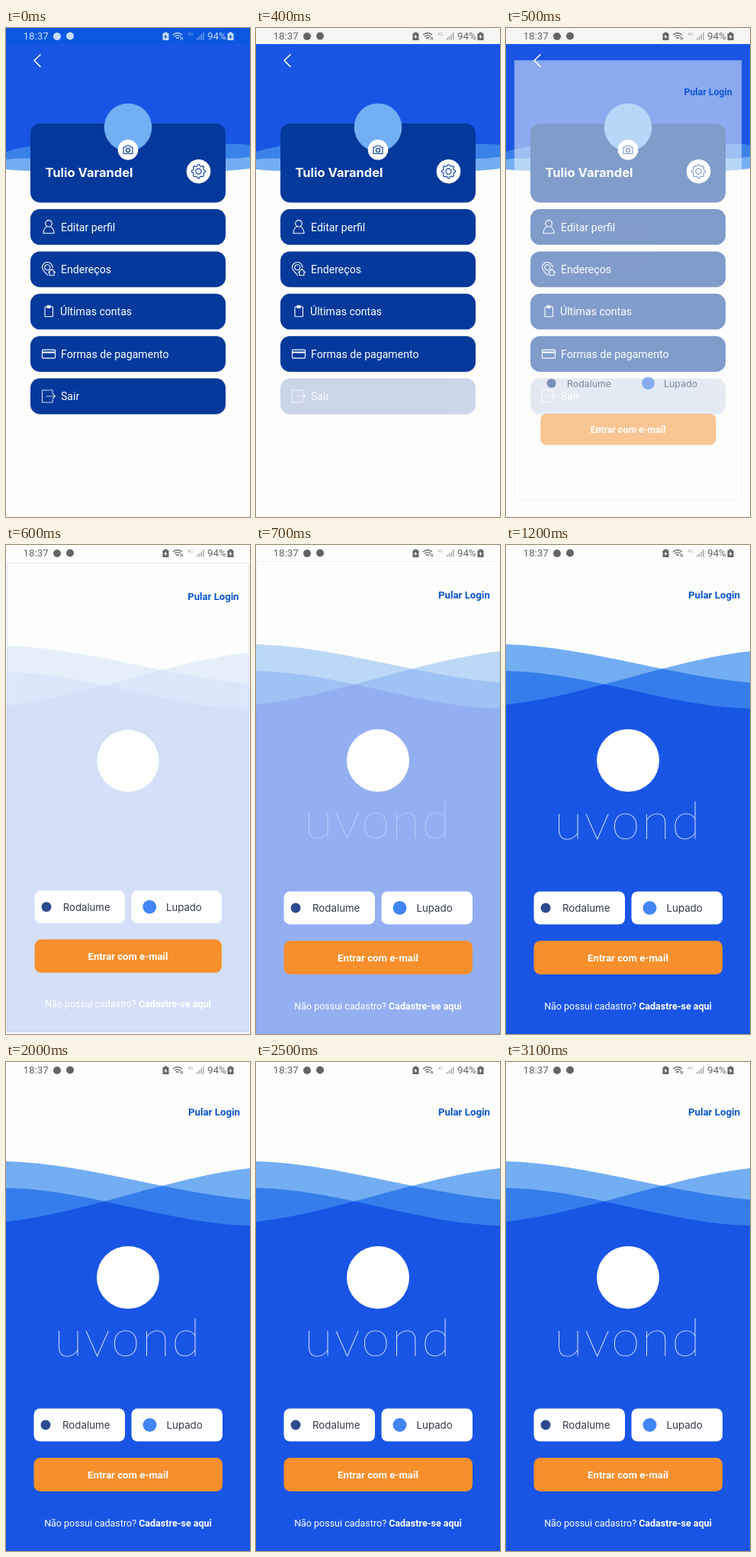
Recreate the animation shown at these times as an HTML page. Size 320 by 640 pixels, loop 3200 ms.

```html
<!DOCTYPE html>
<html lang="pt">
<head>
<meta charset="utf-8">
<style>
  html, body { margin: 0; width: 100%; height: 100%; overflow: hidden; background: #fdfefc; }
  svg { display: block; width: 320px; height: 640px; }
  text { font-family: Roboto, sans-serif; }
  .inter { font-family: Inter, sans-serif; }
  .bold { font-weight: 700; }
  .line { fill: none; stroke: #fff; stroke-width: 1.1; stroke-linejoin: round; stroke-linecap: round; }
  .blue { stroke: #02399a; }
  #login { transform-origin: 160px 331px; }
</style>
</head>
<body>
<svg viewBox="0 0 320 640">
  <rect width="320" height="640" fill="#fdfefc"/>

  <g id="profile">
    <path fill="#73aef2" d="M0 0H320V184Q304 186 288 187H32Q16 187 0 185Z"/>
    <path fill="#3a82ea" d="M0 0H320V168.500Q304 171 288 171H32Q16 169.500 0 172Z"/>
    <path fill="#1955e5" d="M0 0H320V153Q304 151 288 152L32 154.500Q16 157 0 162Z"/>
    <path class="line" style="stroke-width:1.7" d="M45 35L37 42.500L45 50.500"/>
    <rect x="32" y="125" width="256" height="103.500" rx="13" fill="#02399a"/>
    <circle cx="160" cy="130" r="31.300" fill="#73aff3"/>
    <circle cx="160" cy="159.300" r="13.300" fill="#fff"/>
    <path class="line blue" d="M154 156H156.500L158 154H162L163.500 156H166V164.500H154Z"/>
    <circle class="line blue" cx="160" cy="160" r="2.600"/>
    <circle cx="252.500" cy="187.700" r="15.800" fill="#fff"/>
    <path id="gear" class="line blue"/>
    <circle class="line blue" cx="252.500" cy="187.700" r="3.600"/>
    <text class="inter bold" x="51.500" y="195" font-size="16.500" fill="#fff">Tulio Varandel</text>
    <g id="menu"></g>
  </g>

  <g id="login">
    <rect id="sheet" y="21" width="320" height="619" fill="#fdfefc"/>
    <g id="waves"></g>
    <text class="bold" x="239" y="69.500" font-size="13.250" fill="#0a55cf">Pular Login</text>
    <circle cx="160" cy="282" r="41" fill="#fff"/>
    <text id="wordmark" x="160" y="384.500" font-size="69" text-anchor="middle" fill="#fff"
      style="font-family:Lato,sans-serif;font-weight:200;letter-spacing:2px">uvond</text>
    <rect x="36.500" y="453.500" width="119.500" height="43" rx="8" fill="#fff"/>
    <rect x="164.500" y="453.500" width="119.500" height="43" rx="8" fill="#fff"/>
    <circle cx="52" cy="475" r="6.500" fill="#2c4a8e"/>
    <circle cx="188.500" cy="475" r="9" fill="#4285f4"/>
    <g class="inter" font-size="13.300" fill="#333a4c">
      <text class="inter" x="74" y="480">Rodalume</text>
      <text class="inter" x="210.500" y="480">Lupado</text>
    </g>
    <rect x="36.500" y="518" width="247.500" height="44" rx="8.500" fill="#f78f2c"/>
    <text class="bold" x="160" y="545" font-size="13.200" text-anchor="middle" fill="#fff">Entrar com e-mail</text>
    <text x="160" y="608" font-size="12.500" text-anchor="middle" fill="#fff">Não possui cadastro? <tspan class="bold">Cadastre-se aqui</tspan></text>
  </g>

  <g id="status">
    <rect id="statusBar" width="320" height="21"/>
    <g id="statusIcons">
      <text x="22.500" y="15.300" font-size="13.400">18:37</text>
      <circle cx="67" cy="11" r="5"/>
      <circle cx="84" cy="10.500" r="5"/>
      <path fill-rule="evenodd" d="M207.500 5.500H211.500V7H213.500V16H205.500V7H207.500ZM209.500 8.500L207.300 12H209L208.500 14.500L211.700 11H210Z"/>
      <g fill="none" stroke="currentColor" stroke-width="1.300">
        <path d="M219 9Q225 4 231 9M221 11.300Q225 8 229 11.300M223 13.500Q225 12 227 13.500"/>
        <path d="M229.500 11.500V15.500M231.500 12V15.500" stroke-width="1"/>
      </g>
      <g opacity=".55">
        <text x="238" y="10" font-size="6">4G</text>
        <path d="M250 13h1.500v2.500h-1.500zM252.700 11h1.500v4.500h-1.500zM255.400 8.500h1.500v7h-1.500zM258.100 6h1.500v9.500h-1.500z"/>
      </g>
      <text x="264" y="15.300" font-size="13.400">94%</text>
      <path fill-rule="evenodd" d="M292.500 5.500H296.500V7H298.500V16H290.500V7H292.500ZM295 8L292.300 12H294.200L293.700 15L296.700 10.700H294.800Z"/>
    </g>
  </g>
</svg>

<script>
const LOOP = 3200, STEP = 100;
const $ = id => document.getElementById(id);
const ramp = (t, from, to) => Math.min(1, Math.max(0, (t - from) / (to - from)));

// Icons are centred on (0, 0).
const menuItems = [
  ['Editar perfil', 72, '<circle cy="-4.500" r="4.300"/><path d="M-7 8.300C-7 2-4 .5-2.500-.5M7 8.300C7 2 4 .5 2.500-.5M-7 8.300H7"/>'],
  ['Endereços', 72, '<path d="M-1.500 7.500C-5 4-8.500 1-8.500-2.500A6.700 6.700 0 0 1 5-2.500"/><circle cx="-1.700" cy="-2.500" r="3.500"/><path d="M-.5 4L4-.5L8.500 4M1 3V8H7V3"/>'],
  ['Últimas contas', 71, '<rect x="-5" y="-6.500" width="10.500" height="13" rx="1"/><path fill="#fff" d="M-2-8H2V-5H-2Z"/>'],
  ['Formas de pagamento', 72, '<rect x="-8.500" y="-5.500" width="17" height="11" rx="1"/><path stroke-width="2" d="M-8-2H8" style="stroke-width:2"/>'],
  ['Sair', 72, '<path stroke-opacity=".8" d="M5-4V-8H-8.500V8H5V4M-3 0H8.500M5.500-3L8.500 0L5.500 3"/>']
];
$('menu').innerHTML = menuItems.map(([label, x, icon], i) => `
  <g transform="translate(0 ${237 + i * 55.4})">
    <rect x="32" width="256" height="46.800" rx="12.500" fill="#02399a"/>
    <g class="line" transform="translate(56 23.400)">${icon}</g>
    <text x="${x}" y="28.500" font-size="14.100" fill="#fff">${label}</text>
  </g>`).join('');
const exitButton = $('menu').lastElementChild;

$('gear').setAttribute('d', 'M' + Array.from({ length: 32 }, (_, i) => {
  const angle = (i - 0.5) * Math.PI / 16, r = i % 4 < 2 ? 9 : 7.2;
  return `${252.5 + r * Math.cos(angle)} ${187.7 + r * Math.sin(angle)}`;
}).join('L') + 'Z');

// Three crossing curves; each colour starts where one more curve has been passed.
const curves = [[130, 133, 171, 180], [209, 197, 151, 139], [165, 166, 212, 214]];
const bezier = ([a, b, c, d], t) => {
  const u = 1 - t;
  return a * u ** 3 + 3 * b * u * u * t + 3 * c * u * t * t + d * t ** 3;
};
$('waves').innerHTML = ['#73aef2', '#347deb', '#1955e5'].map((color, level) => {
  let edge = '';
  for (let x = 0; x <= 320; x += 2) {
    const heights = curves.map(curve => bezier(curve, x / 320)).sort((p, q) => p - q);
    edge += `L${x} ${heights[level].toFixed(2)}`;
  }
  return `<path fill="${color}" d="M0 640${edge}L320 640Z"/>`;
}).join('');

function draw(now) {
  const t = Math.floor(now % LOOP / STEP) * STEP;
  const lightBar = t >= 300;
  const fade = ramp(t, 540, 886);
  const scale = 1 - 0.07 * Math.pow(1 - ramp(t, 500, 800), 5);

  exitButton.setAttribute('opacity', 1 - 0.8 * ramp(t, 50, 250));
  $('profile').style.display = t < 600 ? '' : 'none';

  $('login').style.display = t >= 500 ? '' : 'none';
  $('login').style.opacity = t < 600 ? 0.5 : 1;
  $('login').style.transform = `scale(${scale})`;
  $('sheet').setAttribute('stroke', scale < 1 ? '#dfe7f0' : 'none');
  $('waves').setAttribute('opacity', fade);
  $('wordmark').setAttribute('opacity', fade);

  const ink = lightBar ? '#626466' : '#c9dcfb';
  $('statusBar').setAttribute('fill', !lightBar ? '#0b58e0' : t < 600 ? '#f5f6f4' : '#fdfefc');
  $('statusIcons').setAttribute('fill', ink);
  $('statusIcons').setAttribute('color', ink);
}

const start = performance.now();
function tick() {
  draw(performance.now() - start);
  requestAnimationFrame(tick);
}
tick();
</script>
</body>
</html>
```
